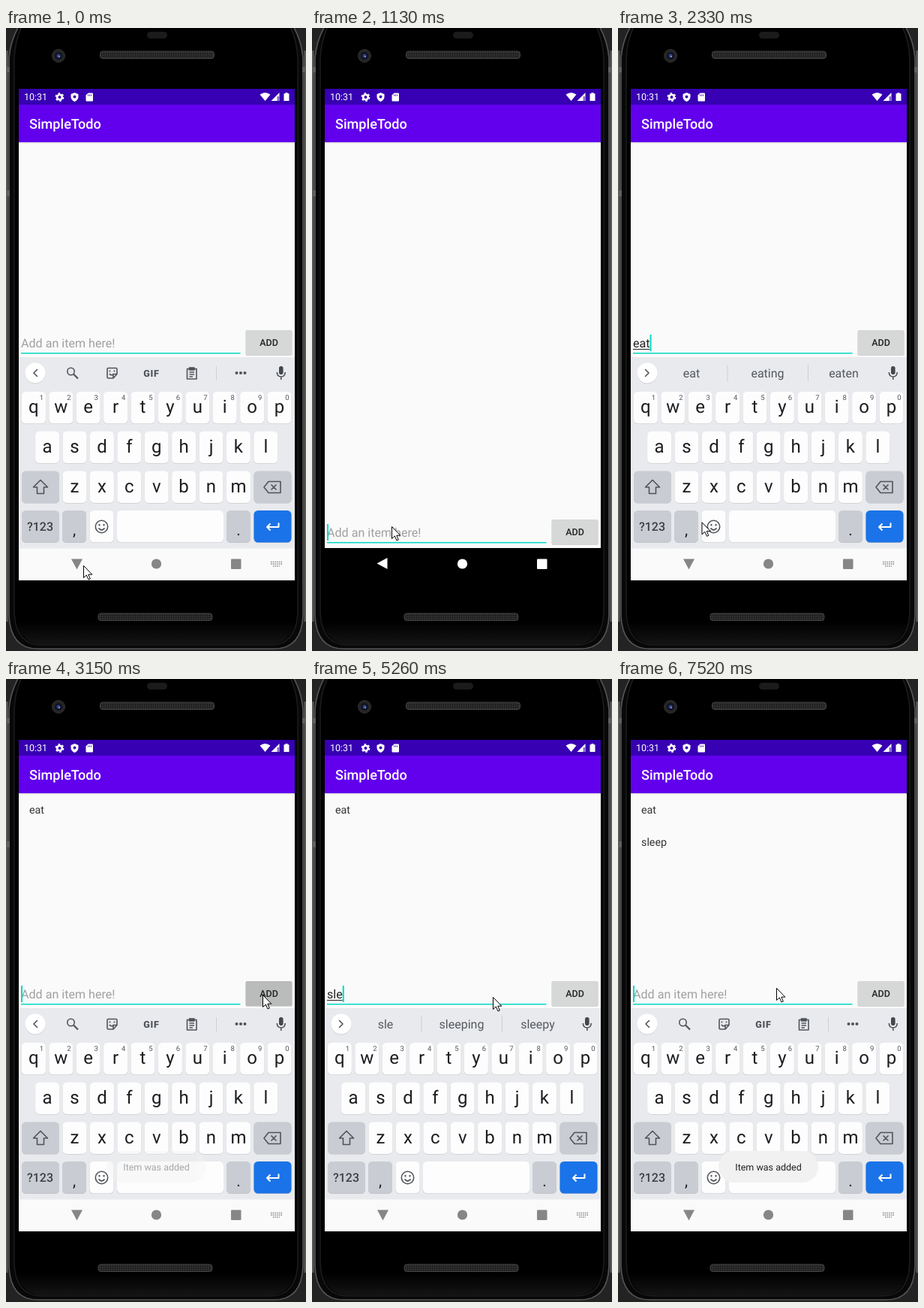
These frames come from a looping animation (400x829 px, 8000 ms). An HTML page:

```html
<!DOCTYPE html>
<html lang="en">
<head>
<meta charset="utf-8">
<title>To-do app on a phone</title>
<style>
html, body { margin: 0; width: 100%; height: 100%; overflow: hidden; background: #000; }
svg { display: block; width: 100%; height: 100%; font-family: Roboto, "Noto Sans", sans-serif; text-rendering: geometricPrecision; }
.mid { text-anchor: middle; }
.med { font-weight: 500; }
.line { fill: none; stroke: #505459; stroke-width: 1.6; stroke-linejoin: round; }
</style>
</head>
<body>
<svg viewBox="0 0 400 829" preserveAspectRatio="none">
  <defs>
    <clipPath id="screen"><rect x="17" y="81" width="368" height="654"/></clipPath>
    <pattern id="mesh" width="3" height="3" patternUnits="userSpaceOnUse">
      <rect width="3" height="3" fill="#303030"/><circle cx="1.5" cy="1.5" r=".9" fill="#151515"/>
    </pattern>
    <linearGradient id="chin" x2="0" y2="1">
      <stop offset="0" stop-color="#000"/><stop offset="1" stop-color="#141414"/>
    </linearGradient>
  </defs>

  <!-- phone body -->
  <rect width="400" height="829" fill="#232323"/>
  <path d="M4 40Q6 16 18 -4H382Q394 16 396 40V782Q394 826 358 826H42Q6 826 4 782Z" fill="#080808" stroke="#555" stroke-width="1.6"/>
  <path d="M11 40Q12 16 22 -4H378Q388 16 389 40V778Q387 821 352 821H48Q13 821 11 778Z" fill="#000" stroke="#1d1d1d" stroke-width="1.5"/>
  <path d="M13 790H387Q378 820 352 820H48Q22 820 13 790Z" fill="url(#chin)"/>
  <path d="M0 30H2.500V790H0ZM397.500 30H400V790H397.500Z" fill="#5a5a5a"/>
  <path d="M0 52H5V59H0ZM0 216H5V224H0ZM395 52H400V59H395Z" fill="#606060"/>
  <rect x="188" y="5" width="27" height="9" rx="4.5" fill="#1b1b1b"/>
  <rect x="125.5" y="31" width="152" height="9.5" rx="3.5" fill="url(#mesh)" stroke="#474747"/>
  <rect x="123" y="779" width="152" height="9.5" rx="3.5" fill="url(#mesh)" stroke="#474747"/>
  <circle cx="70" cy="37" r="8.5" fill="#252527" stroke="#303030"/>
  <circle cx="70" cy="37" r="5" fill="#10131f"/>
  <circle cx="70" cy="37" r="2.5" fill="#33428c"/>
  <circle cx="71" cy="38" r="1" fill="#8da0e8"/>

  <g clip-path="url(#screen)">
    <!-- app -->
    <rect x="17" y="152" width="368" height="540" fill="#fafafa"/>
    <rect x="17" y="152" width="368" height="1.500" fill="#000" opacity=".1"/>
    <rect x="17" y="81" width="368" height="21" fill="#3700b3"/>
    <rect x="17" y="102" width="368" height="50" fill="#6200ee"/>
    <g fill="#fff">
      <text x="24" y="96.3" font-size="12.5">10:31</text>
      <text x="31" y="134" font-size="18.1" class="med">SimpleTodo</text>
      <circle cx="71.5" cy="92" r="3.3" fill="none" stroke="#fff" stroke-width="2.6"/>
      <circle cx="71.5" cy="92" r="5.1" fill="none" stroke="#fff" stroke-width="1.6" stroke-dasharray="2.7 2.64"/>
      <path d="M91.500 86L96.500 88V92Q96 96 91.500 98Q87 96 86.500 92V88Z"/>
      <circle cx="91.500" cy="91.500" r="1.9" fill="#3700b3"/>
      <path d="M109.500 86.500H115Q116 86.500 116 87.500V96.500Q116 97.500 115 97.500H107.500Q106.500 97.500 106.500 96.500V89.500Z"/>
      <path d="M109.500 88.500V90.500M111.500 88.500V90.500M113.500 88.500V90.500" stroke="#3700b3" stroke-width=".9"/>
      <path d="M338.500 88.500Q345.500 83.500 352.500 88.500L345.500 97Z"/>
      <path d="M364.500 86V97H353.500Z"/>
      <path d="M361.500 91V97H364.500V91Z" fill="#8d6ad3"/>
      <path d="M372.500 86H375.500V87.300H377.500V97H370.500V87.300H372.500Z"/>
    </g>
    <g font-size="14.3" fill="#333">
      <text id="item1" x="31" y="179">eat</text>
      <text id="item2" x="31" y="222">sleep</text>
    </g>

    <!-- input row -->
    <g id="row">
      <text id="entry" x="20" y="425" font-size="16.1"></text>
      <rect id="compose" x="20" y="427" height="1" fill="#222"/>
      <rect x="20" y="432" width="292.500" height="1.500" fill="#03dac5"/>
      <rect id="caret" y="408" width="2" height="22" fill="#03dac5"/>
      <rect x="319.500" y="403" width="62" height="33" rx="2" fill="#000" opacity=".16"/>
      <rect id="button" x="319.500" y="402" width="62" height="33" rx="2"/>
      <text x="350.500" y="423" font-size="12.5" class="mid med" fill="#222">ADD</text>
    </g>

    <!-- keyboard -->
    <rect x="17" y="692" width="368" height="43" fill="#000"/>
    <g id="board">
      <rect x="17" y="438" width="368" height="255" fill="#e8eaed"/>
      <rect x="17" y="692.500" width="368" height="43" fill="#fafafa"/>
      <circle cx="39" cy="460" r="13.500" fill="#cfd2d6"/>
      <circle cx="39" cy="459" r="13.500" fill="#fff"/>
      <path id="chevron" d="M41.500 454.500L37 459L41.500 463.500" class="line" stroke-linecap="round"/>
      <g id="tools" class="line">
        <circle cx="86.500" cy="457" r="4.700"/><path d="M90 460.500L96 466.500" stroke-width="2.2"/>
        <path d="M136.500 452.500H146.500Q148 452.500 148 454V460.500L143 466H136.500Q135 466 135 464.500V454Q135 452.500 136.500 452.500ZM148 460.500H143V466M138 460Q140 463 143 461"/>
        <path d="M138.500 455.500V457.500M144.500 455.500V457.500"/>
        <path d="M241.500 453.500H254V467H241.500ZM244.500 458H251M244.500 461H251M244.500 464H249"/>
        <path d="M244.500 452H251V455H244.500Z" fill="#505459"/>
        <path d="M280.500 450V469" stroke="#cdd0d4" stroke-width="1"/>
        <text x="194" y="463.500" font-size="12.5" font-weight="900" letter-spacing=".8" class="mid" fill="#505459" stroke="none">GIF</text>
        <g fill="#505459" stroke="none"><circle cx="307.500" cy="459" r="2"/><circle cx="313" cy="459" r="2"/><circle cx="318.500" cy="459" r="2"/></g>
      </g>
      <g id="words" font-size="16" fill="#55595e" class="mid">
        <path d="M146 448.500V470M253.500 448.500V470" stroke="#cdd0d4"/>
        <text x="98" y="465"></text><text x="199.500" y="465"></text><text x="301" y="465"></text>
      </g>
      <rect x="364" y="450" width="5.600" height="11" rx="2.8" fill="#44484d"/>
      <path d="M361.300 458Q361.500 464 366.800 464Q372 464 372.300 458M366.800 464V468" class="line"/>
      <g id="keys"></g>
    </g>

    <!-- navigation -->
    <g id="nav">
      <path id="back" d="M-8 0L6 -7.500V7.500Z"/>
      <circle cx="200.500" cy="713" r="6.600"/>
      <rect x="300" y="706.500" width="13.500" height="13.500" rx="1"/>
    </g>
    <path id="ime" d="M353 710.500H368M353 713.200H368M356 716H365" stroke="#858585" stroke-width="1.4" stroke-dasharray="1.5 1.2" fill="none"/>

    <g id="toast">
      <rect x="134" y="628" width="133" height="42" rx="21" fill="#f1f1f2"/>
      <text x="200.500" y="653.500" font-size="12.5" class="mid" fill="#222">Item was added</text>
    </g>
  </g>
  <path id="mouse" d="M.5 .5V16.500L4.300 13L7 19L9.300 18L6.800 12.200H11.800Z" fill="#fff" stroke="#000"/>
</svg>

<script>
const LOOP = 8000, FRAME = 140, BLINK = 470, KEY = 130;
const $ = id => document.getElementById(id);

// Keyboard
const WHITE = '#fdfdfe', GREY = '#c9ccd3';
const key = (x, y, w, fill) =>
  `<rect x="${x}" y="${y + 1}" width="${w}" height="42" rx="5.500" fill="#000" opacity=".2"/>` +
  `<rect x="${x}" y="${y}" width="${w}" height="42.500" rx="5.500" fill="${fill}"/>`;
const label = (x, y, size, text, extra = '') =>
  `<text x="${x}" y="${y}" font-size="${size}" class="mid" fill="#1c1d1f" ${extra}>${text}</text>`;

const letters = ['qwertyuiop', 'asdfghjkl', 'zxcvbnm'].map((row, r) => [...row].map((c, i) => {
  const x = 200.7 + (i - (row.length - 1) / 2) * 36.4, y = 484 + r * 52.7;
  const digit = r ? '' : label(x + 10.5, y + 11, 9.5, (i + 1) % 10, 'opacity=".75"');
  return key(x - 16, y, 32, WHITE) + label(x, y + 28.2, 24, c) + digit;
}).join('')).join('');

$('keys').innerHTML = letters +
  key(21, 589.5, 50, GREY) + key(330.5, 589.5, 50, GREY) +
  key(21, 642, 50, GREY) + key(75, 642, 32, GREY) + key(111.5, 642, 32, WHITE) +
  key(148, 642, 142, WHITE) + key(294, 642, 32, GREY) + key(330.5, 642, 50, '#1a73e8') +
  label(45.5, 669, 16, '?123', 'font-weight="500" opacity=".8"') +
  label(91, 675, 21, ',') + label(310, 675, 21, '.') +
  `<g class="line">
    <path d="M46 601.500L55.500 611H50.500V619.500H41.500V611H36.500Z"/>
    <path d="M350 603.500H366V618.500H350L344 611ZM353.500 607.500L360.500 614.500M360.500 607.500L353.500 614.500"/>
    <circle cx="127.500" cy="663.500" r="8.200"/>
    <path d="M123.500 665.500Q127.500 670.500 131.500 665.500M124.500 660V662.500M130.500 660V662.500" stroke-width="1.900"/>
    <path d="M363.500 658.500V664H348.500M352.500 659.500L348 664L352.500 668.500" stroke="#fff" stroke-width="2"/>
  </g>`;

// Each entry is typed from `start` and added to the list at `tap`
const entries = [
  { word: 'eat', more: ['eating', 'eaten'], start: 1940, tap: 3050 },
  { word: 'sleep', more: ['sleeping', 'sleepy'], start: 4900, tap: 6570 }
];
const touches = [190, 1410, ...entries.map(e => e.tap)];
const moves = [
  { from: 710, to: 1130, x: 106, y: 663 },
  { from: 2190, to: 2850, x: 342, y: 420 },
  { from: 3220, to: 3520, x: 241, y: 423 },
  { from: 5840, to: 6030, x: 361, y: 435 },
  { from: 6150, to: 6400, x: 344, y: 420 },
  { from: 6650, to: 7020, x: 211, y: 411 }
];

const ramp = (t, from, to) => Math.min(1, Math.max(0, (t - from) / (to - from)));
const smooth = p => p * p * (3 - 2 * p);

function pointer(t) {
  let x = 103, y = 715;
  for (const m of moves) {
    const p = smooth(ramp(t, m.from, m.to));
    x += (m.x - x) * p;
    y += (m.y - y) * p;
  }
  return [x, y];
}

// The caret stays lit while typing, else blinks from the latest touch
function caretOn(t, text) {
  const last = touches.findLast(time => time <= t);
  return text || (last !== undefined && Math.floor((t - last) / BLINK) % 2 === 0);
}

const show = (id, on) => $(id).setAttribute('visibility', on ? 'visible' : 'hidden');
const move = (id, x, y, turn = 0) => $(id).setAttribute('transform', `translate(${x} ${y}) rotate(${turn})`);
const slots = $('words').querySelectorAll('text');

function draw(t) {
  const step = Math.floor((t - 10) / FRAME) * FRAME + 10;
  const open = 1 - ramp(step, 10, 430) + ramp(step, 1270, 1705);
  const typing = entries.find(e => t >= e.start && t < e.tap);
  const text = typing ? typing.word.slice(0, 1 + Math.floor((t - typing.start) / KEY)) : '';
  const added = entries.filter(e => t >= e.tap);
  const since = added.length ? t - added.at(-1).tap : Infinity;

  move('board', 0, 300 * (1 - open) ** 4);
  move('back', 94.5, 712.5, -90 * (1 - (1 - open) ** 1.5));
  move('row', 0, t >= 150 && t < 1410 ? 252 : 0);
  move('mouse', ...pointer(step));
  $('nav').setAttribute('fill', open <= 0 ? '#fff' : open < 1 ? '#626262' : '#868686');
  show('ime', open > 0);

  $('entry').textContent = text || 'Add an item here!';
  $('entry').setAttribute('fill', text ? '#222' : '#a0a0a0');
  const width = text ? $('entry').getComputedTextLength() : 0;
  $('compose').setAttribute('width', width);
  $('caret').setAttribute('x', 20 + width);
  show('caret', caretOn(t, text));
  $('button').setAttribute('fill', since < 250 ? '#babbbb' : '#d6d7d7');

  show('tools', !text);
  show('words', text);
  $('chevron').setAttribute('transform', text ? 'rotate(180 39 459)' : '');
  const words = typing ? [text, ...typing.more] : [];
  slots.forEach((slot, i) => slot.textContent = words[i] || '');

  show('item1', added.length > 0);
  show('item2', added.length > 1);
  $('toast').setAttribute('opacity', ramp(since, 0, 260) * (1 - ramp(since, 1950, 2100)));
}

const begin = performance.now();
function tick() {
  draw((performance.now() - begin) % LOOP);
  requestAnimationFrame(tick);
}
tick();
</script>
</body>
</html>
```
